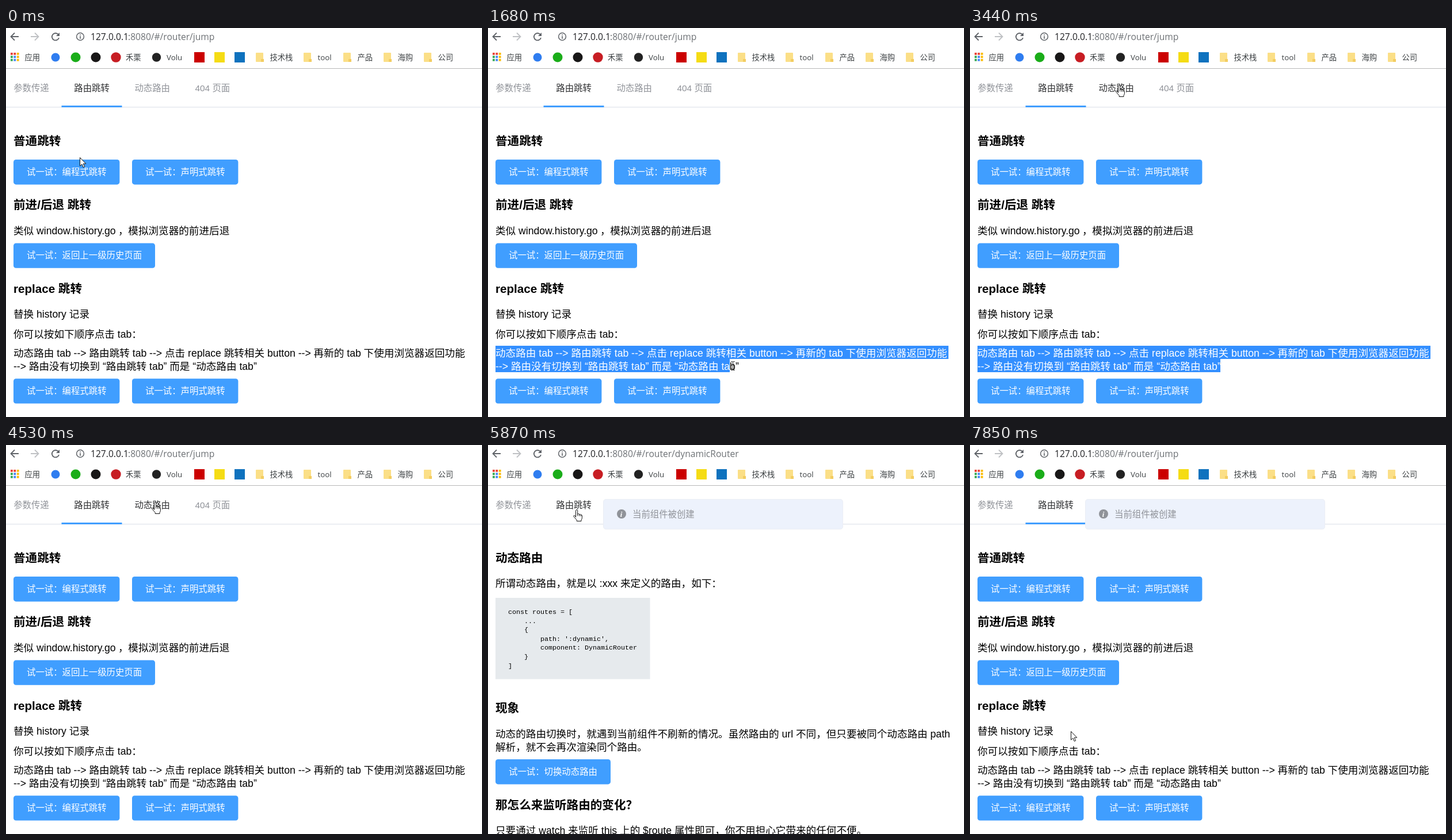
An HTML page that plays this animation: 827x677 px, repeating every 7.99 s.

```html
<!DOCTYPE html>
<html lang="zh-CN">
<head>
<meta charset="utf-8">
<title>Router demo</title>
<style>
  html, body { margin: 0; width: 100%; height: 100%; overflow: hidden; background: #fff; }
  svg { display: block; width: 827px; height: 677px; font-family: "Liberation Sans", "Noto Sans CJK SC", "Noto Sans CJK", sans-serif; }
  .p { font-size: 17.6px; }
  .h { font-size: 20.6px; font-weight: bold; }
  .b { font-size: 15.4px; fill: #fff; }
  .t { font-size: 15.4px; fill: #909399; }
  .t.on { fill: #303133; }
  .u { font: 15.6px "Open Sans", "Noto Sans", sans-serif; fill: #6d7175; }
  .m { font: 13.3px "Open Sans", "Noto Sans CJK SC", "Noto Sans CJK", sans-serif; fill: #3c4043; }
  .c { font: 11.67px "Liberation Mono", monospace; }
  .line { fill: none; stroke: #5f6368; stroke-width: 1.8; }
  .cursor { fill: #fff; stroke: #111; stroke-width: 1; stroke-linejoin: round; }
</style>
</head>
<body>
<svg id="stage" viewBox="0 0 827 677"></svg>
<script>
const text = (cls, x, y, s, attrs = '') => `<text class="${cls}" x="${x}" y="${y}" ${attrs}>${s.replace(/>/g, '&gt;')}</text>`;
const rect = (x, y, w, h, fill, attrs = '') => `<rect x="${x}" y="${y}" width="${w}" height="${h}" fill="${fill}" ${attrs}/>`;
const dot = (x, y, r, fill) => `<circle cx="${x}" cy="${y}" r="${r}" fill="${fill}"/>`;
const button = (x, y, w, label, id = '') =>
  rect(x, y, w, 43.4, '#409eff', `rx="4.4" ${id && `id="${id}"`}`) + text('b', x + 23, y + 27, label);

function browserBar() {
  const apps = ['#ea4335', '#ea4335', '#fbbc05', '#34a853', '#4285f4', '#fbbc05', '#34a853', '#4285f4', '#fbbc05']
    .map((c, i) => rect(8 + i % 3 * 5.4, 43 + Math.floor(i / 3) * 5.4, 3.8, 3.8, c)).join('');
  const rounds = [[86, 7.5, '#2f7df0'], [121, 8.5, '#1aad19'], [156, 8.5, '#181717'], [191, 8.7, '#c71d23'], [261.5, 7.7, '#222']]
    .map(([x, r, c]) => dot(x, 51, r, c)).join('');
  const squares = [[327, '#cb0000'], [362, '#f5dc14'], [397, '#0f72be']]
    .map(([x, c]) => rect(x, 42, 18, 18, c)).join('');
  const folders = [[434, '技术栈'], [517, 'tool'], [586, '产品'], [656, '海购'], [726, '公司']]
    .map(([x, s]) => rect(x, 43, 13, 16, '#fbdf87', 'rx="1"') + rect(x + 9, 54, 5, 5, '#f3cd62') + text('m', x + 24.5, 56, s)).join('');
  return `
    <path class="line" d="M22 15H9M15 8.5L8.5 15l6.5 6.5"/>
    <path class="line" d="M43 15h13M50 8.5l6.5 6.5-6.5 6.5" style="stroke:#bfc1c4"/>
    <path class="line" d="M90.8 11.2A6.2 6.2 0 1 0 92 17"/>
    <path d="M93 8v6h-6z" fill="#5f6368"/>
    <circle class="line" cx="129" cy="15" r="6.4" style="stroke-width:1.5"/>
    ${rect(128.2, 14, 1.6, 4.8, '#5f6368')}${rect(128.2, 11.2, 1.6, 1.6, '#5f6368')}
    ${text('u', 147, 21, '127.0.0.1', 'style="fill:#202124"')}${text('u', 212, 21, '', 'id="path"')}
    ${apps}${rounds}${squares}${folders}
    ${text('m', 32.5, 56, '应用')}${text('m', 208, 56, '禾栗')}${text('m', 279, 56, 'Volu')}
    ${rect(0, 70, 827, 1, '#b8b8b8')}`;
}

const tabs = ['参数传递', '路由跳转', '动态路由', '404 页面']
  .map((s, i) => text('t', 13.2 + 105.1 * i, 110, s, `id="tab${i}"`)).join('');

const steps = text('p', 13, 572, '动态路由 tab --> 路由跳转 tab --> 点击 replace 跳转相关 button --> 再新的 tab 下使用浏览器返回功能')
  + text('p', 13, 595, '--> 路由没有切换到 “路由跳转 tab” 而是 “动态路由 tab”');

const jumpPage = text('h', 13, 204, '普通跳转')
  + button(13, 229, 184.4, '试一试：编程式跳转') + button(219, 229, 184.4, '试一试：声明式跳转', 'hoverButton')
  + text('h', 13, 315, '前进/后退 跳转')
  + text('p', 13, 359, '类似 window.history.go') + text('p', 195, 359, '，') + text('p', 212.3, 359, '模拟浏览器的前进后退')
  + button(13, 374.4, 246, '试一试：返回上一级历史页面')
  + text('h', 13, 461, 'replace 跳转')
  + text('p', 13, 504, '替换 history 记录')
  + text('p', 13, 539, '你可以按如下顺序点击 tab：')
  + steps
  + `<clipPath id="selected"><rect id="clip1" x="13" y="553" height="23"/><rect id="clip2" x="13" y="576" height="23"/></clipPath>
     <g clip-path="url(#selected)" fill="#fff">${rect(13, 553, 787, 46, '#338fff')}${steps}</g>`
  + button(13, 610.2, 184.4, '试一试：编程式跳转') + button(219, 610.2, 184.4, '试一试：声明式跳转');

const code = [[0, 'const routes = ['], [4, '...'], [4, '{'], [8, "path: ':dynamic',"], [8, 'component: DynamicRouter'], [4, '}'], [0, ']']]
  .map(([indent, s], i) => text('c', 35 + 7 * indent, 294 + 15.6 * i, s)).join('');

const dynamicPage = text('h', 13, 204, '动态路由')
  + text('p', 13, 247, '所谓动态路由，就是以 :xxx 来定义的路由，如下：')
  + rect(13, 266, 268.5, 141.5, '#e6eaed') + code
  + text('h', 13, 465, '现象')
  + text('p', 13, 509, '动态的路由切换时，就遇到当前组件不刷新的情况。虽然路由的 url 不同，但只要被同个动态路由 path')
  + text('p', 13, 532, '解析，就不会再次渲染同个路由。')
  + button(13, 547, 200, '试一试：切换动态路由')
  + text('h', 13, 634, '那怎么来监听路由的变化？')
  + text('p', 13, 677, '只要通过 watch 来监听 this 上的 $route 属性即可，你不用担心它带来的任何不便。');

const message = rect(200.5, 0.5, 416, 52, '#edf2fc', 'rx="4.4" stroke="#ebeef5"')
  + dot(232, 26, 8, '#909399')
  + text('', 229.7, 30.5, 'i', 'style="font:italic bold 13px Liberation Serif,serif;fill:#fff"')
  + text('t', 251, 32, '当前组件被创建');

const $ = id => document.getElementById(id);
$('stage').innerHTML = `${browserBar()}
  ${rect(0, 137, 827, 1.4, '#e4e7ed')}${rect(96.5, 135, 105, 3, '#409eff', 'id="underline"')}${tabs}
  <g id="jump">${jumpPage}</g><g id="dynamic">${dynamicPage}</g>
  <g id="message">${message}</g>
  <path class="cursor" id="arrow" d="M.5 .5V15.2L3.9 12 6.2 17.6 8.6 16.6 6.3 11.2H10.8Z"/>
  <path class="cursor" id="hand" d="M4.5 13.5V2.4q0-1.7 1.6-1.7t1.6 1.7V8q2.7-1 2.9.7 2.5-.7 2.6.9 2.2-.5 2.2 1.4v3.8q0 2-1.4 3.6v2.1H6.2v-2L1 12.6Q.2 11 1.8 10.5q.9-.2 2.7 3M7.7 8v3.5M10.6 8.8v3M13.2 9.8v2.3"/>
  <path class="cursor" id="beam" d="M0.5 .5H2.7L3.5 1.2 4.3 .5H6.5M3.5 1.2V14.8M.5 15.5H2.7L3.5 14.8 4.3 15.5H6.5" style="fill:none"/>`;

// Each track lists [start time, ...values]; values hold until a later entry starts.
const pointer = [
  [0, 'arrow', 128, 225], [150, 'hand', 74, 415], [290, 'arrow', 66, 440], [410, 'beam', 48, 488],
  [540, 'beam', 28, 528], [660, 'beam', 16, 551], [970, 'beam', 15, 553], [1250, 'beam', 56, 557],
  [1400, 'beam', 181, 561], [1530, 'beam', 380, 565], [1680, 'beam', 422, 580], [1800, 'beam', 430, 586],
  [2080, 'beam', 442, 595], [2680, 'arrow', 415, 535], [2800, 'hand', 385, 250], [2920, 'arrow', 440, 169],
  [3040, 'arrow', 494, 249], [3190, 'arrow', 410, 180], [3320, 'arrow', 310, 124], [3440, 'hand', 253, 99],
  [5160, 'arrow', 258, 103], [5590, 'arrow', 214, 109], [5720, 'arrow', 169, 113], [5870, 'hand', 148, 112],
  [7580, 'arrow', 166, 176], [7700, 'hand', 184, 250], [7850, 'arrow', 175, 498]
];
const selection = [[0, 0, 0], [1250, 18, 0], [1400, 167, 0], [1530, 366, 0], [1680, 787, 407], [1800, 787, 416], [2080, 787, 422], [4530, 0, 0]];
const underline = [[0, 96.5], [4920, 201.6], [7460, 115], [7580, 96.5]];
const notice = [[0, 0, 42], [4770, 0.8, 82], [4920, 1, 90], [5040, 1, 93.5], [5160, 1, 94]];
const at = (track, t) => track.findLast(entry => entry[0] <= t).slice(1);
const show = (id, visible) => $(id).setAttribute('display', visible ? 'inline' : 'none');

function draw(t) {
  const dynamic = t >= 4650 && t < 7330;
  show('jump', !dynamic);
  show('dynamic', dynamic);
  $('path').textContent = ':8080/#/router/' + (dynamic ? 'dynamicRouter' : 'jump');
  $('tab1').classList.toggle('on', !dynamic || t >= 5870);
  $('tab2').classList.toggle('on', dynamic || (t >= 3440 && t < 4650));
  $('underline').setAttribute('x', at(underline, t)[0]);
  $('hoverButton').setAttribute('fill', t >= 2800 && t < 2920 ? '#66b1ff' : '#409eff');

  const [first, second] = at(selection, t);
  $('clip1').setAttribute('width', first);
  $('clip2').setAttribute('width', second);

  const [opacity, top] = at(notice, t);
  $('message').setAttribute('opacity', opacity);
  $('message').setAttribute('transform', `translate(0 ${top})`);

  const [kind, x, y] = at(pointer, t);
  for (const id of ['arrow', 'hand', 'beam']) show(id, id === kind);
  $(kind).setAttribute('transform', `translate(${x} ${y})`);
}

const start = performance.now();
function frame() {
  draw((performance.now() - start) % 7990);
  requestAnimationFrame(frame);
}
frame();
</script>
</body>
</html>
```
